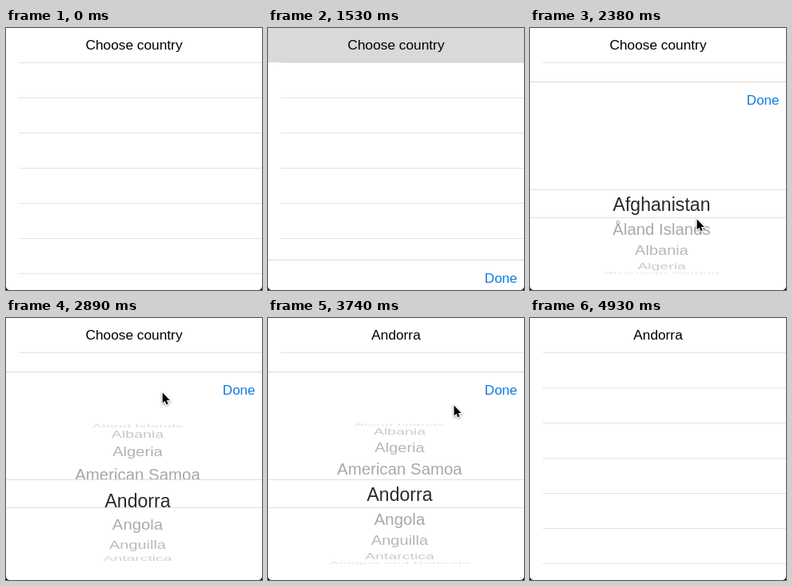
An HTML page with a canvas that plays this animation: 320x328 px, repeating every 5440 ms.

```html
<!DOCTYPE html>
<html lang="en">
<head>
<meta charset="utf-8">
<title>Country picker</title>
<style>
  html, body { margin: 0; width: 100%; height: 100%; overflow: hidden; background: #fff; }
  canvas { display: block; width: 320px; height: 328px; }
</style>
</head>
<body>
<canvas id="stage"></canvas>
<script>
const WIDTH = 320, HEIGHT = 328, LOOP = 5440, TICK = 170;
const FONT = '"Liberation Sans", Arial, sans-serif';
const COUNTRIES = ['Afghanistan', 'Åland Islands', 'Albania', 'Algeria', 'American Samoa',
  'Andorra', 'Angola', 'Anguilla', 'Antarctica', 'Antigua and Barbuda', 'Argentina'];

// Moments of the story, in ms
const TAP = 1530, OPEN = 1511, DRAG = 2550, RELEASE = 2890, PICKED = 3400,
  DONE_PRESSED = 4420, CLOSE = 4574.8;

// The sheet rests at SHEET_TOP and sinks by SHEET_TRAVEL when closed.
const SHEET_TOP = 67, SHEET_TRAVEL = 261, BAND_TOP = 202.3, BAND_BOTTOM = 236.5;
const WHEEL = { x: 164.5, y: 220.3, radius: 87, step: 21.1 * Math.PI / 180 };

// Key points [time, ...values], joined by eased motion
const REACH = [[510, 224, 145], [680, 158, 100], [1020, 159, 28]];
const SWIPE = [[2380, 207, 239], [DRAG, 200, 246], [RELEASE, 194, 93], [3230, 194, 92],
  [PICKED, 202, 118], [4080, 282, 93]];
const SCROLL = [[DRAG, 0], [RELEASE, 4.78], [3230, 4.89], [PICKED, 5]];

const ARROW = new Path2D('M0 0v12.8l2.9-2.7 1.9 4.5 2.2-.9-1.9-4.4h4z');

const canvas = document.getElementById('stage');
const ratio = window.devicePixelRatio || 1;
canvas.width = WIDTH * ratio;
canvas.height = HEIGHT * ratio;
const ctx = canvas.getContext('2d');
ctx.scale(ratio, ratio);

// Smoothstep with a slow start
function ease(p) {
  const q = p ** 1.3;
  return q * q * (3 - 2 * q);
}

// Share of the way covered by a critically damped spring
function spring(ms) {
  const wt = Math.max(0, ms) * 0.035;
  return 1 - (1 + wt) * Math.exp(-wt);
}

function follow(points, time) {
  const next = points.findIndex(point => point[0] > time);
  if (next < 1) return points.at(next).slice(1);
  const [from, to] = [points[next - 1], points[next]];
  const share = ease((time - from[0]) / (to[0] - from[0]));
  return from.slice(1).map((value, i) => value + (to[i + 1] - value) * share);
}

function box(x, y, w, h, color) {
  ctx.fillStyle = color;
  ctx.fillRect(x, y, w, h);
}

const rule = (x, y, color) => box(x, Math.round(y), WIDTH - x, 1, color);

function label(text, x, y, size, color, align = 'center') {
  ctx.font = `${size}px ${FONT}`;
  ctx.textAlign = align;
  ctx.fillStyle = color;
  ctx.fillText(text, x, y);
}

function clipped(top, bottom, draw) {
  ctx.save();
  ctx.beginPath();
  ctx.rect(0, Math.round(top), WIDTH, Math.round(bottom) - Math.round(top));
  ctx.clip();
  draw();
  ctx.restore();
}

function drawTable(time) {
  box(0, 0, WIDTH, HEIGHT, '#fff');
  if (time === TAP) box(0, 0, WIDTH, 43, '#d9d9d9');
  for (let y = 43; y < HEIGHT; y += 44) rule(16, y, '#e3e3e5');
  label(time < PICKED ? 'Choose country' : 'Andorra', 160, 27, 17.3, '#000');
}

function drawRows(centerY, position, size, magnify, color) {
  COUNTRIES.forEach((name, i) => {
    const angle = (i - position) * WHEEL.step;
    if (Math.abs(angle) > 1.53) return;
    const cos = Math.cos(angle);
    ctx.save();
    ctx.translate(WHEEL.x, centerY + WHEEL.radius * magnify * Math.sin(angle));
    ctx.scale(1 - 0.09 * (1 - cos), 0.12 + 0.88 * cos);
    label(name, 0, size * 0.36, size, color(cos));
    ctx.restore();
  });
}

function drawSheet(time) {
  const drop = SHEET_TRAVEL * (1 - spring(time - OPEN) + spring(time - CLOSE));
  const [top, bandTop, bandBottom, centerY] =
    [SHEET_TOP, BAND_TOP, BAND_BOTTOM, WHEEL.y].map(y => y + drop);
  const [position] = follow(SCROLL, time);
  const grey = cos => `rgba(0, 0, 0, ${0.08 + 0.28 * cos})`;
  const greyRows = () => drawRows(centerY, position, 20.5, 1, grey);
  const lensRows = () => drawRows(centerY, position, 23.1, 1.13, () => '#2a2a2a');

  box(0, Math.round(top), WIDTH, HEIGHT, '#fff');
  label('Done', 311.5, 96 + drop, 17, time < DONE_PRESSED ? '#0a7be0' : '#c3dcf5', 'right');
  clipped(top, bandTop, greyRows);
  clipped(bandTop, bandBottom, lensRows);
  clipped(bandBottom, HEIGHT, greyRows);
  rule(0, top, '#d9d9d9');
  rule(0, bandTop, '#dedede');
  rule(0, bandBottom, '#dedede');
}

function drawPointer(time) {
  const path = [REACH, SWIPE].find((points, i) =>
    time >= points[0][0] && time < [TAP, CLOSE][i]);
  if (!path) return;
  const [x, y] = follow(path, time);
  ctx.save();
  ctx.translate(x + 1.7, y + 0.6);
  ctx.lineWidth = 2;
  ctx.strokeStyle = '#fff';
  ctx.shadowColor = 'rgba(0, 0, 0, 0.4)';
  ctx.shadowBlur = 3 * ratio;
  ctx.shadowOffsetY = ratio;
  ctx.stroke(ARROW);
  ctx.shadowColor = 'transparent';
  ctx.fillStyle = '#000';
  ctx.fill(ARROW);
  ctx.restore();
}

function drawCorners() {
  const r = 4;
  ctx.fillStyle = '#000';
  for (const [x, side] of [[0, 1], [WIDTH, -1]]) {
    ctx.beginPath();
    ctx.moveTo(x, HEIGHT);
    ctx.lineTo(x, HEIGHT - r);
    ctx.quadraticCurveTo(x + side * 0.6, HEIGHT - 0.6, x + side * r, HEIGHT);
    ctx.fill();
  }
}

const start = performance.now();

function render() {
  const time = Math.floor((performance.now() - start) % LOOP / TICK) * TICK;
  drawTable(time);
  drawSheet(time);
  drawPointer(time);
  drawCorners();
  requestAnimationFrame(render);
}

render();
</script>
</body>
</html>
```
